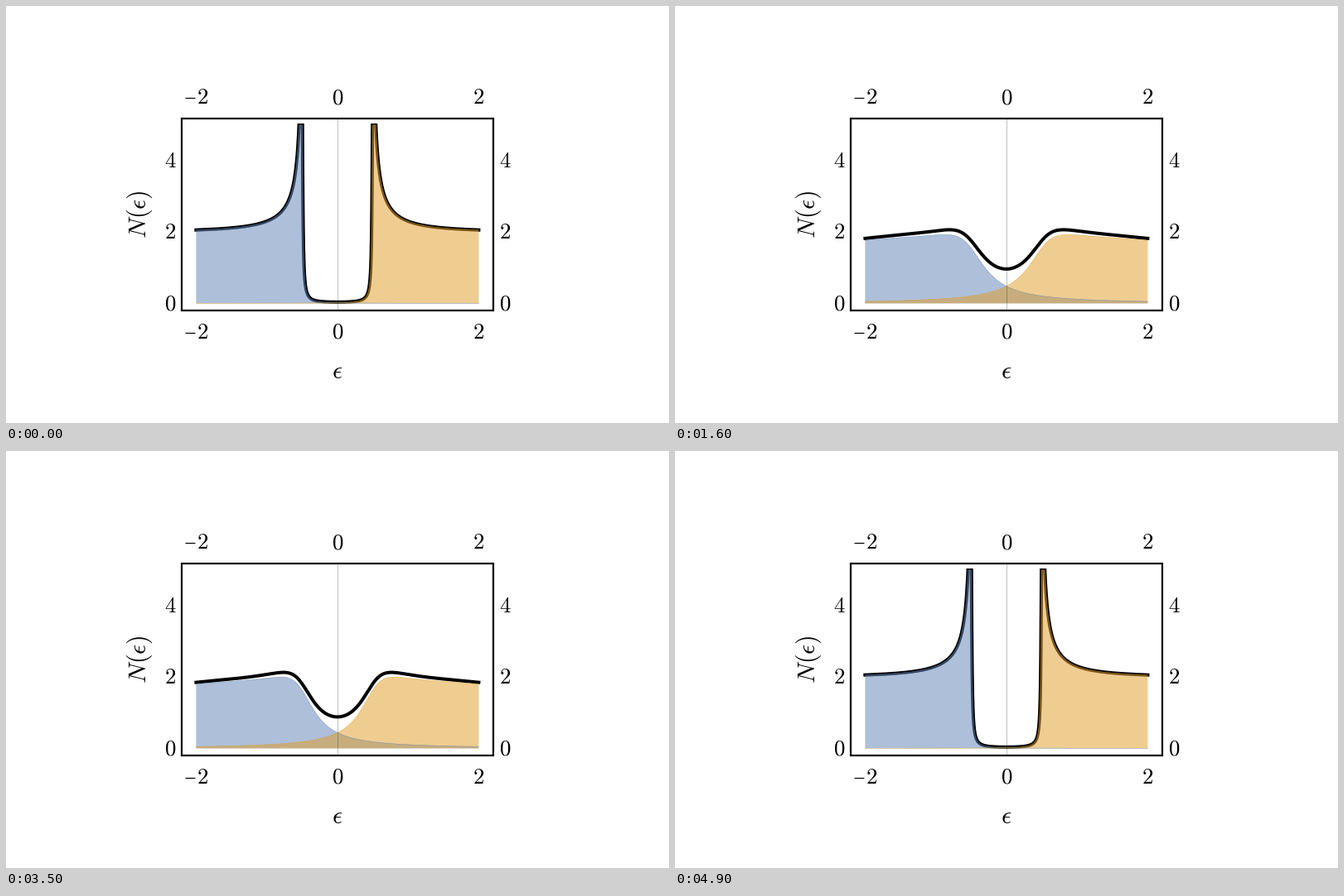
Write a matplotlib script that moves like this. It is 800 px wide and 504 px high and loops after 5 s.

```python
import numpy as np
import matplotlib.pyplot as plt
from matplotlib.animation import FuncAnimation
from matplotlib.patches import Rectangle

plt.rcParams["mathtext.fontset"] = "cm"

W, H, DPI = 800, 504, 100
PT = 72 / DPI
FRAMES = 50
BLUE = (0.368, 0.507, 0.710)
ORANGE = (0.881, 0.611, 0.142)
GAP, CUTOFF, TOP = 0.5, 3.0, 5.0


def px(e):
    return 399.9 + 85.25 * np.asarray(e)


def py(n):
    return 359.4 - 43.1 * np.asarray(n)


eps = np.linspace(-2, 2, 3201)
xi, step = np.linspace(0, CUTOFF, 601, retstep=True)
energy = np.sqrt(xi**2 + GAP**2)
weight = np.full(xi.size, 2 * step)
weight[[0, -1]] = step


def upper_band(gamma):
    """Density of the upper branch, each level broadened to a Lorentzian."""
    d = eps[:, None] - energy
    return (gamma / np.pi / (d * d + gamma**2)) @ weight


bands = [upper_band(0.01 + 0.02 * i) for i in range(FRAMES // 2)]

fig = plt.figure(figsize=(W / DPI, H / DPI), dpi=DPI, facecolor="white")
ax = fig.add_axes([0, 0, 1, 1])
ax.set_xlim(0, W)
ax.set_ylim(H, 0)
ax.axis("off")

xs = px(eps)
total, = ax.plot([], [], color="black", lw=4 * PT, zorder=1,
                 solid_capstyle="projecting", solid_joinstyle="round")
ceiling = py(TOP) - 1.5
total.set_clip_path(Rectangle((0, ceiling), W, H - ceiling, transform=ax.transData))


def make_band(color, z):
    fill, = ax.fill([0, 1, 1], [0, 0, 1], color=color, alpha=0.5, lw=0, zorder=z)
    edge, = ax.plot([], [], color=color, lw=0.5 * PT, alpha=0.8, zorder=z + 2)
    return fill, edge


lower = make_band(BLUE, 2)
upper = make_band(ORANGE, 3)

ax.plot([px(0)] * 2, [136, 368], color="black", alpha=0.25, lw=PT, zorder=6)
ax.add_patch(Rectangle((212, 136), 375.5, 232, fill=False, ec="black",
                       lw=2.2 * PT, joinstyle="miter", zorder=7))


def label(x, y, text, size=27, **kw):
    ax.text(x, y, f"${text}$", fontsize=size * PT, ha="center", **kw)


def number(x, y, value):
    base = y + 8.7
    if value < 0:
        ax.plot([x - 13.5, x - 1], [base - 7.2] * 2, color="black",
                lw=1.2 * PT, solid_capstyle="butt")
        x += 8
    label(x, base, abs(value), va="baseline")


for v in (-2, 0, 2):
    for y in (109.5, 393):
        number(px(v), y, v)
for v in (0, 2, 4):
    for x in (198, 602):
        number(x, py(v) - 0.5, v)
label(400, 450, r"\epsilon", 30, va="baseline")
label(161, 252, r"N(\epsilon)", 30, va="center", rotation=90)


def set_band(band, n):
    fill, edge = band
    ys = py(np.minimum(n, TOP))
    fill.set_xy(np.column_stack([np.r_[xs[0], xs, xs[-1]],
                                 np.r_[py(0), ys, py(0)]]))
    edge.set_data(xs, ys)


def update(k):
    up = bands[min(k, FRAMES - 1 - k)]
    down = up[::-1]
    total.set_data(xs, py(up + down))
    set_band(lower, down)
    set_band(upper, up)
    return total, *lower, *upper


anim = FuncAnimation(fig, update, frames=FRAMES, interval=100,
                     repeat=True, repeat_delay=0, blit=False)
plt.show()
```
